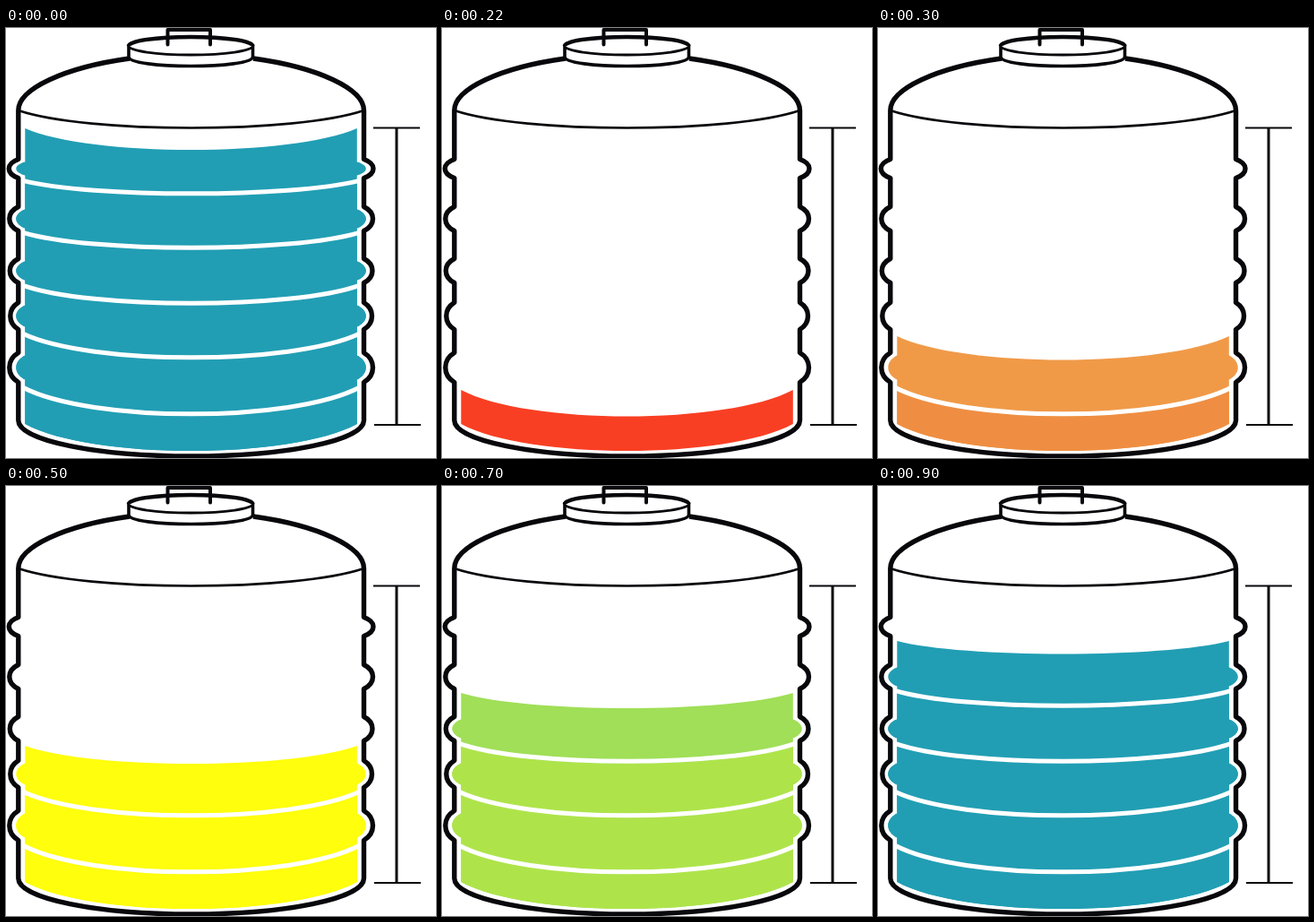
Animation of 480 by 480 pixels, one loop 1.1 s. Source, as an HTML page with a canvas:

```html
<!DOCTYPE html>
<html lang="en">
<head>
<meta charset="utf-8">
<title>Tank level</title>
<style>
  html, body { margin: 0; width: 100%; height: 100%; overflow: hidden; background: #fff; }
  canvas { display: block; }
</style>
</head>
<body>
<canvas id="stage" width="480" height="480"></canvas>
<script>
const ctx = document.getElementById("stage").getContext("2d");
const INK = "#08070b", WHITE = "#fff";
const LEFT = 13.8, RIGHT = 399.5, MID = 207;
const FILL_LEFT = 21.3, FILL_RIGHT = 391.8;

// Ribs on the wall: centre y, half height, distance they stand out.
const RIBS = [[157, 10.5, 10.5], [213, 13.5, 10], [271, 13.5, 9.5], [321.5, 15, 9], [379, 16.5, 10]];

// Band tops from the highest to the lowest: y at the wall and sag in the middle.
const BANDS = [[112, 24], [173, 14.5], [231, 17], [290, 20], [344, 26.5], [404, 29.5]];
const BASE = [442, 30];

// Each level: start time, index of its top band, lower colour, top colour.
const LEVELS = [
  [0, 0, "#219eb4"],
  [100, 5, "#f93f23"],
  [300, 4, "#ef8e42", "#f09a48"],
  [500, 3, "#fffe0c"],
  [700, 2, "#aee44a", "#a0df57"],
  [900, 1, "#219eb4"]
];
const LOOP = 1100;

function sag(path, x0, x1, y, depth) {
  const reach = (x1 - x0) * 0.2, cy = y + depth * 4 / 3;
  path.bezierCurveTo(x0 + reach, cy, x1 - reach, cy, x1, y);
}

function sagLine(x0, x1, y, depth) {
  const path = new Path2D();
  path.moveTo(x0, y);
  sag(path, x0, x1, y, depth);
  return path;
}

function rib(path, x, [y, half, out], side, dir) {
  const peak = x + side * out, shoulder = x + side * out * 0.55;
  const at = k => y + dir * half * k;
  path.lineTo(x, at(-1));
  path.bezierCurveTo(shoulder, at(-0.8), peak, at(-0.45), peak, y);
  path.bezierCurveTo(peak, at(0.45), shoulder, at(0.8), x, at(1));
}

function makeShell() {
  const p = new Path2D();
  p.moveTo(138, 34);
  p.bezierCurveTo(65, 44, LEFT, 68, LEFT, 92);
  RIBS.forEach(r => rib(p, LEFT, r, -1, 1));
  p.lineTo(LEFT, 438);
  p.bezierCurveTo(LEFT, 461, 104, 478, MID, 478);
  p.bezierCurveTo(310, 478, RIGHT, 461, RIGHT, 438);
  [...RIBS].reverse().forEach(r => rib(p, RIGHT, r, 1, -1));
  p.lineTo(RIGHT, 92);
  p.bezierCurveTo(RIGHT, 68, 349, 44, 276, 34);
  return p;
}

function makeLiquid(top) {
  const [y, depth] = BANDS[top];
  const ribs = RIBS.filter(r => r[0] > y).map(([c, half]) => [c, half - 3, 10]);
  const p = sagLine(FILL_LEFT, FILL_RIGHT, y, depth);
  ribs.forEach(r => rib(p, FILL_RIGHT, r, 1, 1));
  p.lineTo(FILL_RIGHT, BASE[0]);
  sag(p, FILL_RIGHT, FILL_LEFT, ...BASE);
  ribs.reverse().forEach(r => rib(p, FILL_LEFT, r, -1, -1));
  p.closePath();
  return p;
}

function stroke(path, width, color = INK) {
  ctx.lineWidth = width;
  ctx.strokeStyle = color;
  ctx.stroke(path);
}

function fill(path, color) {
  ctx.fillStyle = color;
  ctx.fill(path);
}

const shell = makeShell();
const rim = sagLine(LEFT, RIGHT, 92, 19.5);
const lidSide = new Path2D("M137 20V32C137 46 275.5 46 275.5 32V20");
const lidTop = new Path2D();
lidTop.ellipse(206.2, 20, 69.3, 10, 0, 0, Math.PI * 2);
const lidBack = new Path2D();
lidBack.ellipse(206.2, 20, 69.3, 10, 0, Math.PI, Math.PI * 2);
const handle = new Path2D("M180.5 18.5V2H228V18.5");
const gauge = new Path2D("M436 111V443");
const ticks = new Path2D("M410 111.5H462M411 443H463");
const liquids = BANDS.map((_, i) => makeLiquid(i));

function drawLiquid([, top, color, topColor = color]) {
  fill(liquids[top], topColor);
  if (top + 1 < BANDS.length) fill(liquids[top + 1], color);
  for (const [y, depth] of BANDS.slice(top + 1)) {
    stroke(sagLine(19, 394.5, y - 2.7, depth), 5, WHITE);
  }
}

function drawTank() {
  ctx.lineJoin = "round";
  ctx.lineCap = "butt";
  stroke(shell, 5.4);
  stroke(rim, 2.6);
  fill(lidSide, WHITE);
  stroke(lidSide, 3.6);
  fill(lidTop, WHITE);
  stroke(lidTop, 2.8);
  stroke(lidBack, 4.4);
  ctx.lineCap = "round";
  stroke(handle, 4);
  ctx.lineCap = "butt";
  stroke(gauge, 3);
  stroke(ticks, 2);
}

function frame() {
  const t = performance.now() % LOOP;
  ctx.fillStyle = WHITE;
  ctx.fillRect(0, 0, 480, 480);
  drawLiquid(LEVELS.findLast(level => t >= level[0]));
  drawTank();
  requestAnimationFrame(frame);
}
frame();
</script>
</body>
</html>
```
